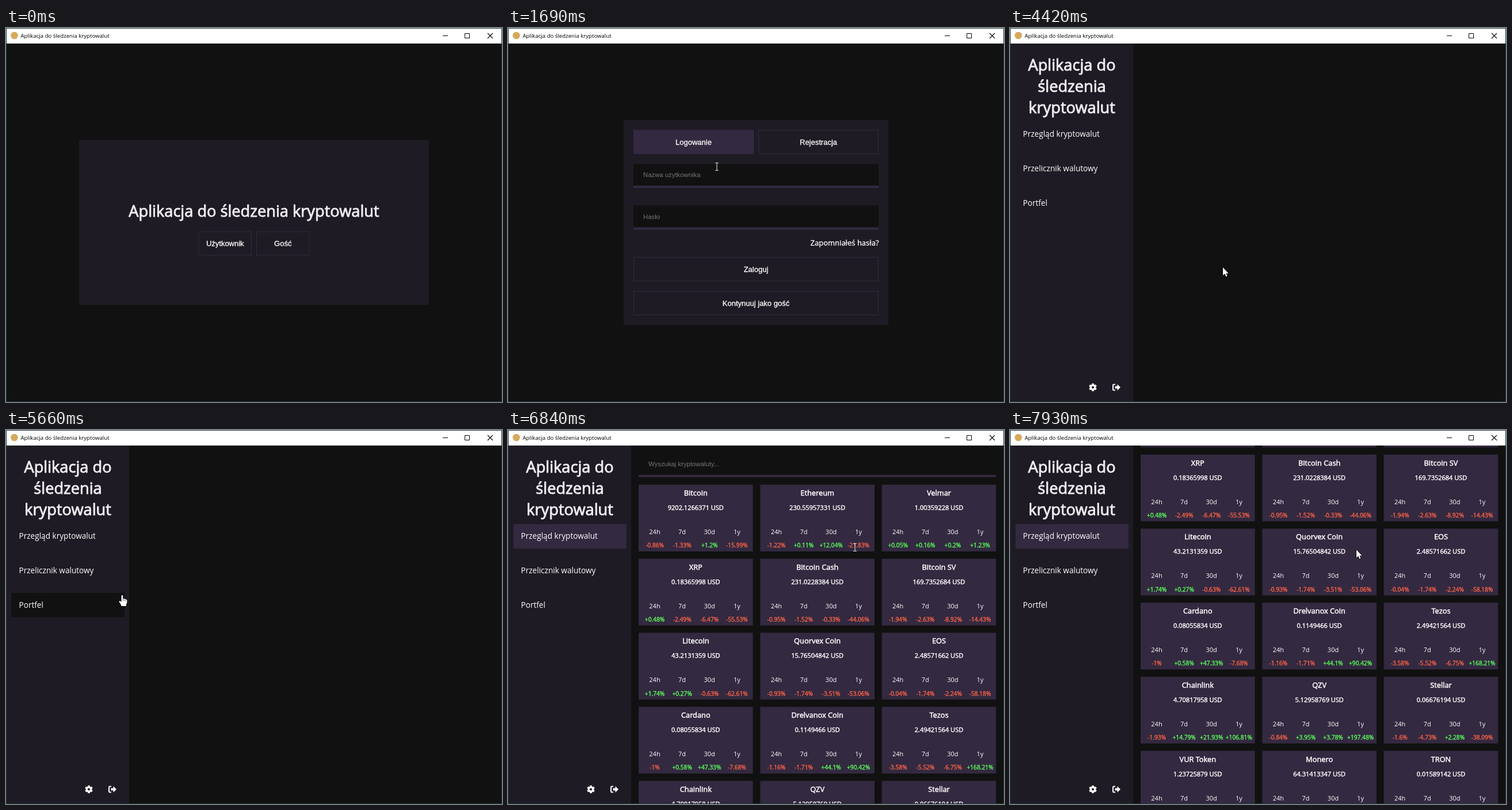
An HTML page with a canvas for the animation above (8000 ms loop, 862 by 650 pixels).

```html
<!DOCTYPE html>
<html lang="pl">
<head>
<meta charset="utf-8">
<title>Aplikacja do śledzenia kryptowalut</title>
<style>
html, body { margin: 0; width: 100%; height: 100%; overflow: hidden; background: #111; }
canvas { display: block; }
</style>
</head>
<body>
<canvas id="stage" width="862" height="650"></canvas>
<script>
const ctx = document.getElementById('stage').getContext('2d');
const LOOP = 8000;
const BACK = '#111', PANEL = '#1f1b24', ACCENT = '#332940', HINT = '#757575';
const RED = '#ff6347', GREEN = '#5aff5a', COIN = '#b565c5';
const OPEN = '"Open Sans", sans-serif';
const ARIAL = '"Liberation Sans", Arial, sans-serif';
const TITLE = 'Aplikacja do śledzenia kryptowalut';
const LOGIN_AT = 1150, FILL_AT = 2790, HOME_AT = 4420, LOAD_AT = 6130, CARDS_AT = 6760, SCROLL_AT = 7770;

// name | price | change over 24h, 7d, 30d, 1y
const coins = `Bitcoin|9202.1266371|-0.86 -1.33 +1.2 -15.99
Ethereum|230.55957331|-1.22 +0.11 +12.04 -21.83
Velmar|1.00359228|+0.05 +0.16 +0.2 +1.23
XRP|0.18365998|+0.48 -2.49 -6.47 -55.53
Bitcoin Cash|231.0228384|-0.95 -1.52 -0.33 -44.06
Bitcoin SV|169.7352684|-1.94 -2.63 -8.92 -14.43
Litecoin|43.2131359|+1.74 +0.27 -0.63 -62.61
Quorvex Coin|15.76504842|-0.93 -1.74 -3.51 -53.06
EOS|2.48571662|-0.04 -1.74 -2.24 -58.18
Cardano|0.08055834|-1 +0.58 +47.33 -7.68
Drelvanox Coin|0.1149466|-1.16 -1.71 +44.1 +90.42
Tezos|2.49421564|-3.58 -5.52 -6.75 +168.21
Chainlink|4.70817958|-1.93 +14.79 +21.93 +106.81
QZV|5.12958769|-0.84 +3.95 +3.78 +197.48
Stellar|0.06676194|-1.6 -4.73 +2.28 -38.09
VUR Token|1.23725879|
Monero|64.31413347|
TRON|0.01589142|`.split('\n').map(line => {
  const [name, price, changes] = line.split('|');
  return { name, price, changes: changes.split(' ').filter(Boolean) };
});

// time, x, y and shape of the mouse pointer
const pointerPath = [
  [0, 655, 583, 'none'], [350, 655, 583, 'arrow'], [620, 480, 440, 'arrow'], [780, 410, 388, 'hand'],
  [930, 377, 381, 'hand'], [LOGIN_AT, 377, 381, 'arrow'], [1450, 377, 381, 'arrow'],
  [1650, 365, 262, 'text'], [1690, 363, 241, 'text'], [2160, 363, 241, 'text'],
  [2560, 362, 338, 'text'], [3090, 362, 338, 'text'], [3200, 365, 354, 'arrow'],
  [3380, 371, 400, 'hand'], [3490, 373, 418, 'hand'], [HOME_AT, 370, 416, 'arrow'],
  [5120, 370, 416, 'arrow'], [5280, 367, 386, 'arrow'], [5420, 367, 386, 'arrow'],
  [5640, 206, 292, 'hand'], [5660, 203, 287, 'hand'], [5900, 60, 200, 'hand'],
  [LOAD_AT, 31, 190, 'hand'], [6290, 31, 190, 'hand'], [6390, 215, 205, 'arrow'],
  [6600, 529, 220, 'arrow'], [CARDS_AT, 600, 206, 'arrow'], [6840, 603, 204, 'text'],
  [7770, 603, 204, 'text'], [7850, 602, 208, 'arrow'], [LOOP, 602, 208, 'arrow']
];
const arrowShape = new Path2D('M0 0V14L3.2 11L5.4 16L7.6 15L5.4 10.4H9.8Z');
const handShape = new Path2D('M-1.5 1Q0-.8 1.3 1V6L4 6.3L6.3 7L8.4 8.3V13L7 16V19H-2V17L-5.6 11.5Q-5.4 9.6-3.6 10L-1.5 12Z');
const dollarS = new Path2D('M7 -9.5C2 -11.7 -7.5 -12 -7.5 -6C-7.5 1 8 -1.5 8 6.5C8 12.5 -1 12.5 -7.5 9M0 -17V-11M0 11V17');

let pointer;

function pointerAt(t) {
  const i = pointerPath.findLastIndex(key => key[0] <= t);
  const a = pointerPath[i], b = pointerPath[i + 1] || a;
  const k = b === a ? 0 : (t - a[0]) / (b[0] - a[0]);
  return { x: a[1] + (b[1] - a[1]) * k, y: a[2] + (b[2] - a[2]) * k, shape: a[3] };
}

function rect(x, y, w, h, color) {
  ctx.fillStyle = color;
  ctx.fillRect(x, y, w, h);
}

function text(str, x, y, size, { font = OPEN, align = 'left', color = '#fff', weight = 0 } = {}) {
  ctx.font = `${size}px ${font}`;
  ctx.textAlign = align;
  ctx.fillStyle = ctx.strokeStyle = color;
  ctx.fillText(str, x, y);
  if (weight) {
    ctx.lineWidth = weight;
    ctx.lineJoin = 'round';
    ctx.strokeText(str, x, y);
  }
}

function line(d, color, width = 1) {
  ctx.strokeStyle = color;
  ctx.lineWidth = width;
  ctx.stroke(new Path2D(d));
}

function disc(x, y, r, color) {
  ctx.fillStyle = color;
  ctx.beginPath();
  ctx.arc(x, y, r, 0, 2 * Math.PI);
  ctx.fill();
}

function hovered(x, y, w, h) {
  return pointer.shape === 'hand' && pointer.x >= x && pointer.x < x + w && pointer.y >= y && pointer.y < y + h;
}

function button(label, x, y, w, h, active) {
  rect(x, y, w, h, ACCENT);
  if (!active && !hovered(x, y, w, h)) rect(x + 1, y + 1, w - 2, h - 2, PANEL);
  text(label, x + w / 2, y + 25.5, 13, { font: ARIAL, align: 'center', weight: 0.3 });
}

function input(x, y, w, value, hint) {
  rect(x, y, w, 38, BACK);
  rect(x, y + 38, w, 4, ACCENT);
  text(value || hint, x + 17, y + 23, 11.33, { font: ARIAL, color: value ? '#fff' : HINT, weight: value ? 0.35 : 0 });
}

function drawWindow() {
  rect(0, 0, 862, 27, '#fff');
  disc(14.5, 13, 6.3, '#d6a95c');
  text(TITLE, 25.5, 17, 9.65, { color: '#000' });
  line('M759 13.5h9M797.5 9.5h8v8h-8z', '#000');
  line('M837 9l9 9M846 9l-9 9', '#000', 1.1);
  ctx.strokeStyle = '#123c44';
  ctx.lineWidth = 1;
  ctx.strokeRect(0.5, 0.5, 861, 649);
}

function drawWelcome() {
  rect(127, 195, 608, 286, PANEL);
  text(TITLE, 431, 328, 27.2, { align: 'center', color: '#f0eef2', weight: 0.9 });
  button('Użytkownik', 334.5, 353.5, 92.5, 42);
  button('Gość', 435, 353.5, 92.5, 42);
}

function drawLogin(t) {
  const filled = t >= FILL_AT;
  rect(201, 160, 460, 356, PANEL);
  button('Logowanie', 218, 177, 209, 42, true);
  button('Rejestracja', 435, 177, 209, 42);
  input(218, 236, 426, filled && 'sennaporzeczka', 'Nazwa użytkownika');
  input(218, 308.5, 426, filled && '•'.repeat(14), 'Hasło');
  text('Zapomniałeś hasła?', 644.5, 377.5, 13, { align: 'right', weight: 0.3 });
  button('Zaloguj', 218, 398, 426, 42);
  button('Kontynuuj jako gość', 218, 457, 426, 42);
  if (t >= 2090 && t < 3720) rect(filled ? 290 : 235, t < 2480 ? 248 : 321, 1, 13, '#fff');
}

function drawSidebar(t) {
  rect(1, 27, 213, 622, PANEL);
  TITLE.replace(' ś', '\nś').replace(' k', '\nk').split('\n').forEach((row, i) =>
    text(row, 107.5, 74 + 36.9 * i, 27.2, { align: 'center', color: '#f0eef2', weight: 0.9 }));
  ['Przegląd kryptowalut', 'Przelicznik walutowy', 'Portfel'].forEach((label, i) => {
    const y = 163.5 + 59.75 * i;
    if (i === 0 && t >= LOAD_AT) rect(9.5, y, 196.5, 42.5, ACCENT);
    else if (hovered(9.5, y, 196.5, 42.5)) rect(9.5, y, 196.5, 42.5, BACK);
    text(label, 22.5, y + 25.8, 13.6);
  });
  drawGear(144, 624.5);
  line('M183 619.5h-2.5q-1.5 0-1.5 1.5v7q0 1.5 1.5 1.5h2.5', '#fff', 2);
  ctx.fillStyle = '#fff';
  ctx.fill(new Path2D('M182.5 622.5h4v-3.5l5.5 5.5l-5.5 5.5v-3.5h-4z'));
}

function drawGear(x, y) {
  for (let i = 0; i < 6; i++) {
    ctx.save();
    ctx.translate(x, y);
    ctx.rotate(i * Math.PI / 3);
    rect(-1.8, -6.7, 3.6, 4, '#fff');
    ctx.restore();
  }
  disc(x, y, 5.2, '#fff');
  disc(x, y, 2.1, PANEL);
}

function drawLoader(age) {
  const angle = 10 * Math.PI * Math.pow(age / 1200, 2.45);
  ctx.save();
  ctx.translate(537.5, 338.3);
  ctx.scale(Math.max(Math.abs(Math.cos(angle)), 0.01), 1);
  disc(0, 0, 25.5, COIN);
  ctx.strokeStyle = BACK;
  ctx.lineWidth = 5;
  ctx.lineCap = 'round';
  ctx.stroke(dollarS);
  ctx.restore();
}

function drawCard({ name, price, changes }, x, y) {
  const center = { align: 'center' };
  rect(x, y, 198.6, 116, ACCENT);
  text(name, x + 99.3, y + 19, 12.8, { ...center, weight: 0.5 });
  text(price + ' USD', x + 99.3, y + 44, 11, { ...center, weight: 0.45 });
  ['24h', '7d', '30d', '1y'].forEach((label, i) => {
    const column = x + 28 + 47.6 * i, change = changes[i];
    text(label, column, y + 86, 11, center);
    if (change) text(change + '%', column, y + 109.3, 10.2, { ...center, color: change[0] === '+' ? GREEN : RED, weight: 0.4 });
  });
}

function drawCards(t) {
  const scroll = t < SCROLL_AT ? 0 : 21 + 80 * Math.floor((t - SCROLL_AT) / 80);
  ctx.save();
  ctx.beginPath();
  ctx.rect(214, 27, 647, 622);
  ctx.clip();
  input(227, 40 - scroll, 621, '', 'Wyszukaj kryptowaluty...');
  coins.forEach((coin, i) => drawCard(coin, 227 + 211.33 * (i % 3), 95 + 128.7 * Math.floor(i / 3) - scroll));
  ctx.restore();
}

function drawPointer() {
  const { x, y, shape } = pointer;
  if (shape === 'none') return;
  ctx.save();
  ctx.translate(Math.round(x), Math.round(y));
  if (shape === 'text') {
    line('M-3 -6.5h2.5l.5 .5l.5 -.5h2.5M0 -6V6M-3 6.5h2.5l.5 -.5l.5 .5h2.5', '#ddd', 1.1);
  } else {
    const path = shape === 'hand' ? handShape : arrowShape;
    ctx.strokeStyle = '#000';
    ctx.lineWidth = 1.6;
    ctx.stroke(path);
    ctx.fillStyle = '#fff';
    ctx.fill(path);
    if (shape === 'hand') line('M1.4 6v4M3.9 7v3M6.2 7.5v3', '#444', 0.7);
  }
  ctx.restore();
}

function draw(t) {
  pointer = pointerAt(t);
  rect(0, 0, 862, 650, BACK);
  if (t < LOGIN_AT) drawWelcome();
  else if (t < HOME_AT) drawLogin(t);
  else {
    drawSidebar(t);
    if (t >= CARDS_AT) drawCards(t);
    else if (t >= LOAD_AT) drawLoader(t - LOAD_AT);
  }
  drawWindow();
  drawPointer();
}

const start = performance.now();
function tick() {
  draw((performance.now() - start) % LOOP);
  requestAnimationFrame(tick);
}
tick();
</script>
</body>
</html>
```
